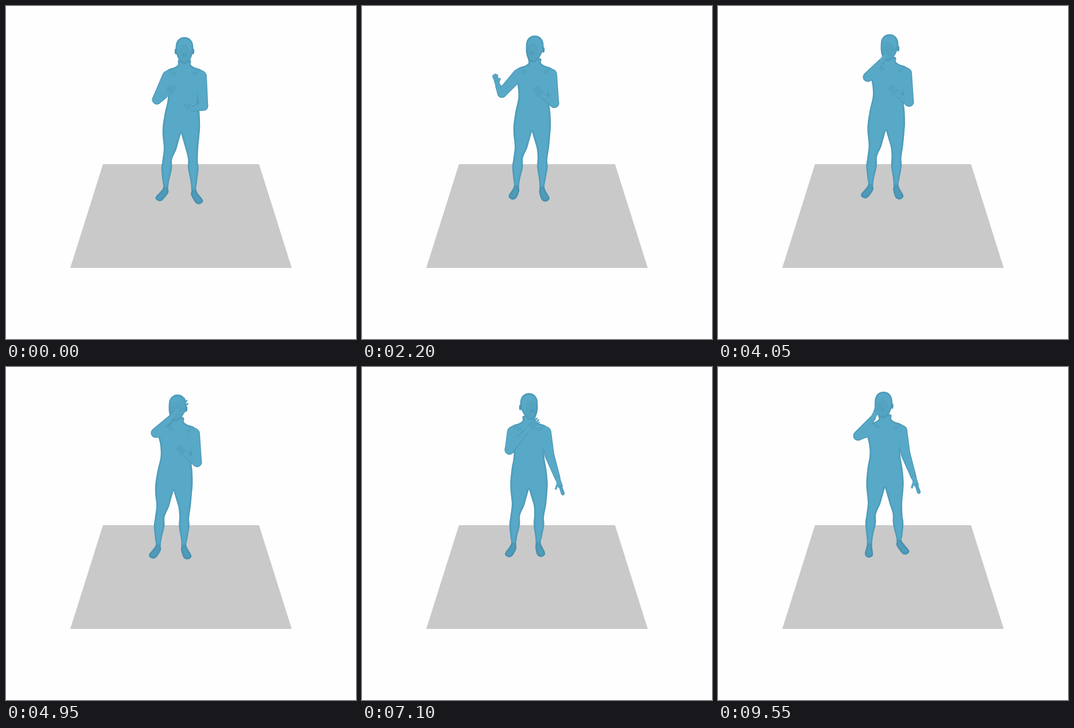
Write an HTML page with a canvas that moves like this. It is 610 by 581 pixels and loops after 9600 ms.

```html
<!DOCTYPE html>
<html lang="en">
<head>
<meta charset="utf-8">
<title>Standing figure</title>
<style>
html, body { margin: 0; width: 100%; height: 100%; overflow: hidden; background: #fefefe; }
canvas { display: block; }
</style>
</head>
<body>
<canvas id="stage" width="610" height="581"></canvas>
<script>
const ctx = document.getElementById('stage').getContext('2d');
const LOOP = 9600, STEP = 50;
const SKIN = '#58a9c8', EDGE = '#4c97b4', SHADE = '#34728c';

// Eased progress from 0 to 1 between two times
function ease(t, from, to) {
  const u = Math.min(1, Math.max(0, (t - from) / (to - from)));
  return u * u * (3 - 2 * u);
}

// Arm poses: elbow, wrist and fingertips, measured from the middle of the chest
const LEFT = {
  ready: [[-48, 44], [-35, 38], [-16, 20]],
  spread: [[-64, 42], [-82, 46], [-98, 40]],
  aside: [[-58, 36], [-66, 25], [-73, 4]],
  face: [[-38, 16], [-17, -11], [-2, -36]],
  brow: [[-38, 2], [-10, -26], [15, -57]],
  chin: [[-34, 34], [-6, 3], [16, -20]],
  temple: [[-47, 12], [-21, -19], [-8, -45]]
};
const RIGHT = {
  ready: [[33, 55], [15, 60], [0, 53]],
  spread: [[43, 45], [67, 46], [86, 41]],
  folded: [[34, 53], [18, 43], [0, 26]],
  hanging: [[36, 44], [50, 84], [60, 113]]
};
const leftMoves = [[0, 'ready'], [550, 'spread'], [1300, 'ready'], [2050, 'aside'],
  [3250, 'face'], [4950, 'brow'], [7100, 'chin'], [8450, 'temple']];
const rightMoves = [[0, 'ready'], [550, 'spread'], [1300, 'folded'], [5800, 'folded'],
  [7000, 'hanging']];

function armPose(poses, moves, t) {
  let i = 0;
  while (i < moves.length - 2 && t >= moves[i + 1][0]) i++;
  const [from, a] = moves[i], [to, b] = moves[i + 1], k = ease(t, from, to);
  return poses[a].map((p, n) => p.map((v, axis) => v + (poses[b][n][axis] - v) * k));
}

// The body drifts left and away while the feet shuffle after it
function bodyPose(t) {
  const x = 305 - 12 * ease(t, 1000, 2800) - 2 * ease(t, 3000, 7000);
  const y = Math.max(211, 222.3 - t * .00125);
  const chest = 311 - 12 * ease(t, 0, 3000) - 8 * ease(t, 5000, 7000);
  const stepIn = 6.5 * ease(t, 7000, 9500);
  const leftToe = [268 - 11.5 * ease(t, 1500, 3000) + stepIn, y + 117 + stepIn * .5];
  const rightToe = [
    336 - 20 * ease(t, 0, 3000) - 4 * ease(t, 5000, 7000) + 14 * ease(t, 7200, 8400),
    115 + y + (y - 211) * .64];
  return {
    x, y, chest,
    headX: chest - 2.5 * ease(t, 8500, 9500),
    turn: 2 * ease(t, 5500, 7000) - ease(t, 300, 1300) - 1.3 * ease(t, 7300, 9500),
    feet: {
      '-1': { ankle: [x - 27, leftToe[1] - 21], toe: leftToe },
      '1': { ankle: [x + 3 + (rightToe[0] - x) * .63, rightToe[1] - 22], toe: rightToe }
    }
  };
}

function smooth(points) {
  const path = new Path2D(), n = points.length, at = i => points[(i + n) % n];
  path.moveTo(...points[0]);
  for (let i = 0; i < n; i++) {
    const [a, b, c, d] = [at(i - 1), at(i), at(i + 1), at(i + 2)];
    path.bezierCurveTo(b[0] + (c[0] - a[0]) / 6, b[1] + (c[1] - a[1]) / 6,
      c[0] - (d[0] - b[0]) / 6, c[1] - (d[1] - b[1]) / 6, c[0], c[1]);
  }
  path.closePath();
  return path;
}

function taper(a, b, ra, rb, color) {
  const dir = Math.atan2(b[1] - a[1], b[0] - a[0]), q = Math.PI / 2;
  ctx.beginPath();
  ctx.arc(...a, ra, dir + q, dir + 3 * q);
  ctx.arc(...b, rb, dir - q, dir + q);
  ctx.fillStyle = color;
  ctx.fill();
}

function ellipse(x, y, rx, ry, color, alpha = 1) {
  ctx.globalAlpha = alpha;
  ctx.fillStyle = color;
  ctx.beginPath();
  ctx.ellipse(x, y, rx, ry, 0, 0, 7);
  ctx.fill();
  ctx.globalAlpha = 1;
}

function line(a, b, width, color) {
  ctx.beginPath();
  ctx.moveTo(...a);
  ctx.lineTo(...b);
  ctx.lineWidth = width;
  ctx.strokeStyle = color;
  ctx.stroke();
}

// Fill a shape, then darken it softly toward its rim
function solid(path, details) {
  ctx.fillStyle = SKIN;
  ctx.fill(path);
  ctx.save();
  ctx.clip(path);
  ctx.strokeStyle = SHADE;
  for (const width of [7, 4, 2]) {
    ctx.globalAlpha = .12;
    ctx.lineWidth = width;
    ctx.stroke(path);
  }
  ctx.globalAlpha = 1;
  details();
  ctx.restore();
}

function drawHand(wrist, tip, thumbSide) {
  const dx = tip[0] - wrist[0], dy = tip[1] - wrist[1];
  const reach = (k, turn) => [
    wrist[0] + k * (dx * Math.cos(turn) - dy * Math.sin(turn)),
    wrist[1] + k * (dy * Math.cos(turn) + dx * Math.sin(turn))];
  const spread = dy > 0 ? .05 : .13;
  for (const [grow, color] of [[1, EDGE], [0, SKIN]]) {
    taper(wrist, reach(.45, 0), 3.8 + grow / 2, 3.8 + grow / 2, color);
    line(reach(.15, 0), reach(.6, thumbSide * .5), 2.4 + grow, color);
  }
  for (let i = -1.5; i < 2; i++) {
    const from = reach(.45, i * spread * 1.4), to = reach(1 - Math.abs(i) * .06, i * spread);
    line(from, to, 2.6, EDGE);
    line(from, to, 1.6, SKIN);
  }
}

function drawHead(x, top, turn) {
  for (const s of [-1, 1])
    ellipse(x + s * (15 - 5 * Math.max(0, s * turn)), top + 25, 2.2, 5, EDGE);
  const jaw = turn * 3;
  const side = s => [[s * 8, 2.3], [s * 13.7, 9], [s * 15.3, 19],
    [s * 13.2 + jaw / 2, 32], [s * 7.5 + jaw, 43]];
  const outline = [[0, 0], ...side(1), [jaw, 47], ...side(-1).reverse()];
  solid(smooth(outline.map(([px, py]) => [x + px, top + py])), () => {
    ellipse(x + turn * 4, top + 29, 10, 16, SHADE, .11);
    for (const s of [-2, 2]) ellipse(x + turn * 6 + s, top + 31, 1, 3, SHADE, .25);
  });
}

function torsoPath({ x, y, chest, feet }) {
  // Upper points lean with the chest, lower ones stay with the hips
  const at = (dx, dy) => [x + dx + (chest - x) * Math.min(1, Math.max(0, -dy / 105)), y + dy];
  const half = s => {
    const { ankle: [ax, ay], toe: [tx, ty] } = feet[s];
    const knee = s < 0 ? x - 24 : x + 9.5 + (ax - x) * .5;
    const calf = knee + (ax - knee) * .3, shin = knee + (ax - knee) * .75;
    return [
      at(s * 10, -128), at(s * 11, -120), at(s * 18, -115), at(s * 28, -111.5),
      at(s * 35, -103), at(s * 29, -82), at(s * 26.5, -60), at(s * 30.5, -34),
      at(s * 32.5, -12), at(s * 32, 4), at(s * 30, 26),
      [knee + s * 8.5, y + 48], [calf + s * 9.3, y + 62], [shin + s * 6, y + 83],
      [ax + s * 4.5, ay], [tx + s * 7, ty - 6], [tx + s * 4, ty], [tx - s * 2, ty + 1],
      [tx - s * 7, ty - 3], [ax - s * 5, ay + 7], [ax - s * 4.5, ay],
      [shin - s * 5.5, y + 83], [calf - s * 9, y + 62], [knee - s * 8.5, y + 45],
      [x + s * 8.5, y + 29], [x + s * 4.5, y + 15], [x + s, y + 3]
    ];
  };
  return smooth([...half(-1), [x, y], ...half(1).reverse()]);
}

function draw(t) {
  const pose = bodyPose(t), { y, chest, feet } = pose;
  const arms = [[LEFT, leftMoves, -1], [RIGHT, rightMoves, 1]].map(([poses, moves, s]) => {
    const [elbow, wrist, tip] = armPose(poses, moves, t)
      .map(([px, py]) => [chest + px, y - 103 + py]);
    const lift = Math.max(0, (y - elbow[1] - 65) * .2);
    return { shoulder: [chest + s * (28.5 - lift), y - 99.5 - lift * .5], elbow, wrist, tip, s };
  });

  ctx.fillStyle = '#fefefe';
  ctx.fillRect(0, 0, 610, 581);
  ctx.fillStyle = '#c9c9c9';
  ctx.beginPath();
  for (const p of [[169, 276], [441, 276], [498, 457], [112, 457]]) ctx.lineTo(...p);
  ctx.fill();

  ctx.lineCap = 'round';
  for (const { shoulder, elbow } of arms) taper(shoulder, elbow, 10.5, 8.3, EDGE);
  solid(torsoPath(pose), () => {
    ctx.globalAlpha = .25;
    for (const { ankle, toe } of Object.values(feet))
      taper([ankle[0], ankle[1] + 4], toe, 7, 10, SHADE);
  });
  for (const { shoulder, elbow, s } of arms) {
    taper(shoulder, elbow, 9.3, 7, SKIN);
    ellipse(shoulder[0] - s * 7, shoulder[1] - 5, 8, 4, SHADE, .12);
  }

  drawHead(pose.headX, y - 168, pose.turn);

  for (const { shoulder, elbow, wrist, tip, s } of arms) {
    taper(elbow, wrist, 8.5, 5, EDGE);
    taper(elbow, wrist, 7, 3.8, SKIN);
    taper(shoulder, elbow, 8, 7, SKIN);
    drawHand(wrist, tip, tip[1] > wrist[1] ? s : -s);
  }
}

const start = performance.now();
function frame() {
  const t = (performance.now() - start) % LOOP;
  draw(Math.floor(t / STEP) * STEP);
  requestAnimationFrame(frame);
}
frame();
</script>
</body>
</html>
```
